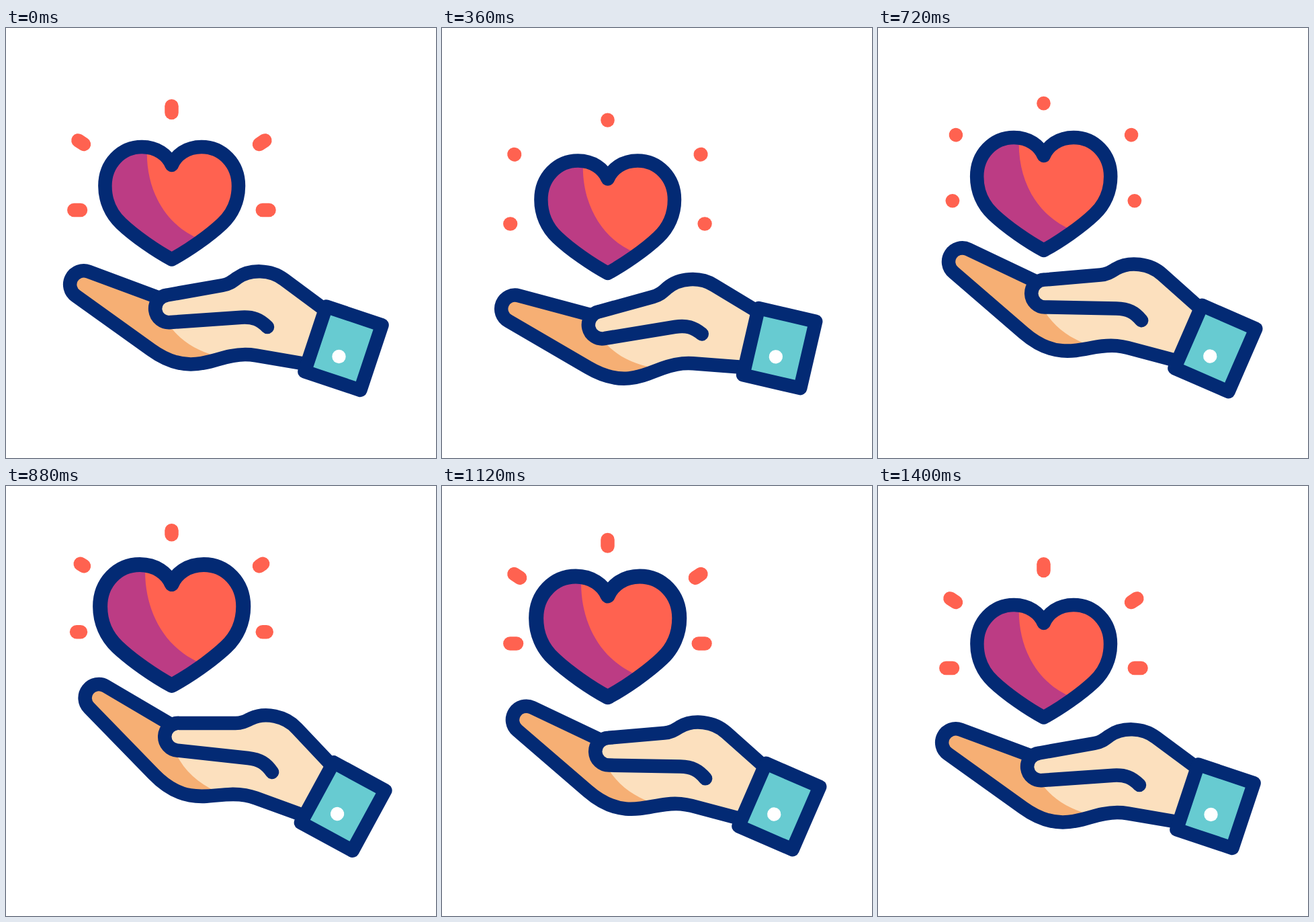
An HTML page that plays this animation: 640x640 px, repeating every 1520 ms.

```html
<!DOCTYPE html>
<html lang="en">
<head>
<meta charset="utf-8">
<title>Giving hand</title>
<style>
  html, body { margin: 0; width: 100%; height: 100%; overflow: hidden; background: #fff; }
  svg { display: block; width: 100%; height: 100%; }
  .ink { fill: none; stroke: #032a74; stroke-width: 20.5; stroke-linecap: round; stroke-linejoin: round; }
  #rays { stroke: #ff6250; stroke-width: 20.5; stroke-linecap: round; }
</style>
</head>
<body>
<svg viewBox="0 0 640 640">
  <g id="hand">
    <path fill="#fce0be" d="M470 416 L414 374.5 C394 359 363 358.5 344 372 C336 378 331 381.5 322 383 L240 397.5 A20.4 20.4 0 0 0 245 438 L230 480 L275 500.5 C305 500.5 325 486 356 486 C362 486 367 486.5 372 487.3 L443 499.5 Z"/>
    <path fill="#f6af74" d="M123 362.7 L229 402 L223 417 L240 438 C256 463 280 479 312 488 L275 500.5 C254 500.5 234 492 216 479 L104 398.7 A20.5 20.5 0 0 1 123 362.7 Z"/>
    <path class="ink" d="M229 402 L123 362.7 A20.5 20.5 0 0 0 104 398.7 L216 479 C234 492 254 500.5 275 500.5 C305 500.5 325 486 356 486 C362 486 367 486.5 372 487.3 L443 499.5"/>
    <path class="ink" d="M470 416 L414 374.5 C394 359 363 358.5 344 372 C336 378 331 381.5 322 383 L240 397.5 A20.4 20.4 0 0 0 245 438 L350 430.7 C368 429.5 378 434 389 445"/>
    <rect class="ink" style="fill:#67cbd1" x="458.3" y="425.75" width="87.4" height="102" transform="rotate(18.4 502 476.75)"/>
    <circle cx="495.5" cy="489" r="10.2" fill="#fff"/>
  </g>
  <g id="lift">
    <g id="rays"></g>
    <g id="heart">
      <path id="shape" fill="#ff6250" d="M246.7 204 C253 189 269 177 291 177 C322 177 346 202 346 235 C346 257 337 277 322 291 C302 310 270 332 246.7 344.5 C223.4 332 191.4 310 171.4 291 C156.4 277 147.4 257 147.4 235 C147.4 202 171.4 177 202.4 177 C224.4 177 240.4 189 246.7 204 Z"/>
      <path fill="#bc3c84" d="M210 178 C207 236 234 292 288 314 L246.7 344.5 C223.4 332 191.4 310 171.4 291 C156.4 277 147.4 257 147.4 235 C147.4 202 171.4 177 202.4 177 Z"/>
      <use href="#shape" id="edge"/>
    </g>
  </g>
</svg>
<script>
  const LOOP = 1520, STEP = 40;
  const $ = id => document.getElementById(id);

  // Swap the reused shape for a stroked copy of the heart outline.
  const edge = $('shape').cloneNode();
  edge.removeAttribute('id');
  edge.removeAttribute('fill');
  edge.setAttribute('class', 'ink');
  $('edge').replaceWith(edge);

  // Each ray: inner x, y, outer x, y
  const rays = [
    [246.5, 126, 246.5, 116.3],
    [116, 173, 107.4, 167.4],
    [377, 173, 385.4, 167.4],
    [111, 271, 101.3, 271],
    [381.8, 271, 391.5, 271]
  ].map(pts => {
    const el = document.createElementNS('http://www.w3.org/2000/svg', 'line');
    $('rays').append(el);
    return { el, pts };
  });

  // Tracks are [step, value] pairs.
  const TURN  = [[1, 0], [12, -6.14], [22, 10.15], [34, 0]];
  const RISE  = [[2, 0], [13, 27.3], [23, -55], [35, 0]];
  const SCALE = [[17, 1], [25, 1.1], [33, 1]];
  const TAIL  = [[2, 0], [11, 1]];
  const HEAD  = [[17, 0], [26, 1]];

  // cubic-bezier(.5, 0, .5, 1)
  function ease(x) {
    let lo = 0, hi = 1;
    for (let i = 0; i < 24; i++) {
      const m = (lo + hi) / 2;
      if (1.5 * m * (1 - m) + m * m * m < x) lo = m; else hi = m;
    }
    return lo * lo * (3 - 2 * lo);
  }

  function at(track, n) {
    if (n <= track[0][0]) return track[0][1];
    for (let i = 1; i < track.length; i++) {
      const [a, u] = track[i - 1], [b, v] = track[i];
      if (n < b) return u + (v - u) * ease((n - a) / (b - a));
    }
    return track[track.length - 1][1];
  }

  function drawRays(n) {
    const growing = n > 17;
    const from = growing ? 0 : at(TAIL, n);
    const to = growing ? at(HEAD, n) : 1;
    $('rays').style.display = to > from ? '' : 'none';
    for (const { el, pts: [x, y, u, v] } of rays) {
      el.setAttribute('x1', x + (u - x) * from);
      el.setAttribute('y1', y + (v - y) * from);
      el.setAttribute('x2', x + (u - x) * to);
      el.setAttribute('y2', y + (v - y) * to);
    }
  }

  function draw(ms) {
    const n = Math.floor(ms % LOOP / STEP);
    $('hand').setAttribute('transform', `rotate(${at(TURN, n)} 500 475)`);
    $('lift').setAttribute('transform', `translate(0 ${at(RISE, n)})`);
    $('heart').setAttribute('transform',
      `translate(246.7 261) scale(${at(SCALE, n)}) translate(-246.7 -261)`);
    drawRays(n);
  }

  const start = performance.now();
  function tick() {
    draw(performance.now() - start);
    requestAnimationFrame(tick);
  }
  tick();
</script>
</body>
</html>
```
